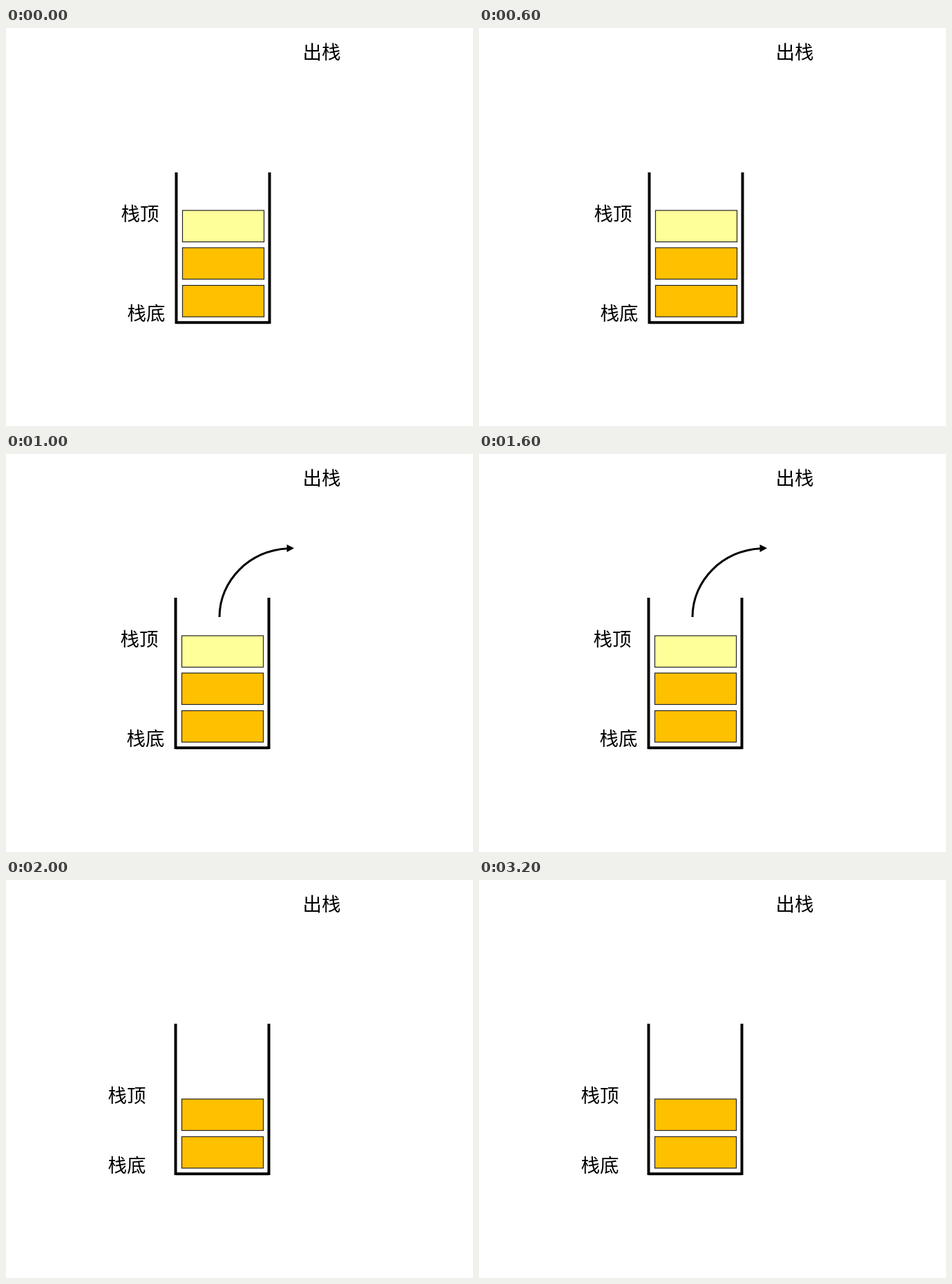
These frames come from a looping animation (676x576 px, 4000 ms). An HTML page:

```html
<!DOCTYPE html>
<html lang="zh-CN">
<head>
<meta charset="utf-8">
<title>出栈</title>
<style>
  html, body { margin: 0; width: 100%; height: 100%; overflow: hidden; background: #fff; }
  svg { display: block; }
  text { font: 27.5px "Noto Sans CJK SC", "Noto Sans CJK", sans-serif; }
  rect { width: 118px; height: 45.5px; stroke: #222; stroke-width: 1.2; fill: #ffc000; }
  .top { fill: #ffff99; }
  .line { fill: none; stroke: #000; }
</style>
</head>
<body>
<svg width="676" height="576" viewBox="0 0 676 576">
  <text x="429.5" y="45">出栈</text>
  <g id="stack">
    <path class="line" stroke-width="4" d="M246.5 209V428M381.5 209V428M246.5 426.3H381.5"/>
    <rect id="item" class="top" x="255.5" y="264"/>
    <rect x="255.5" y="318"/>
    <rect x="255.5" y="372.5"/>
  </g>
  <g id="arrow">
    <path class="line" stroke-width="3" d="M309 236C309 183 353 139 408 136.7"/>
    <path d="M406.5 131L417 136.3L406.5 142Z"/>
  </g>
  <text id="topLabel">栈顶</text>
  <text id="bottomLabel">栈底</text>
</svg>
<script>
  const LOOP = 4000;
  const steps = [
    { at: 0, shift: 0, item: true, arrow: false, top: [166.5, 278.5], bottom: [175.5, 422.5] },
    { at: 1000, shift: -1, item: true, arrow: true, top: [165.5, 277.5], bottom: [174.5, 421.5] },
    { at: 2000, shift: -1, item: false, arrow: false, top: [147.5, 322], bottom: [147.5, 422.5] }
  ];
  const el = id => document.getElementById(id);
  const place = (id, [x, y]) => el(id).setAttribute('transform', `translate(${x} ${y})`);
  const show = (id, on) => el(id).setAttribute('visibility', on ? 'visible' : 'hidden');

  let current;
  function draw(time) {
    const step = steps.findLast(s => s.at <= time % LOOP);
    if (step === current) return;
    current = step;
    place('stack', [step.shift, step.shift]);
    place('topLabel', step.top);
    place('bottomLabel', step.bottom);
    show('item', step.item);
    show('arrow', step.arrow);
  }

  const start = performance.now();
  function tick() {
    draw(performance.now() - start);
    requestAnimationFrame(tick);
  }
  tick();
</script>
</body>
</html>
```
